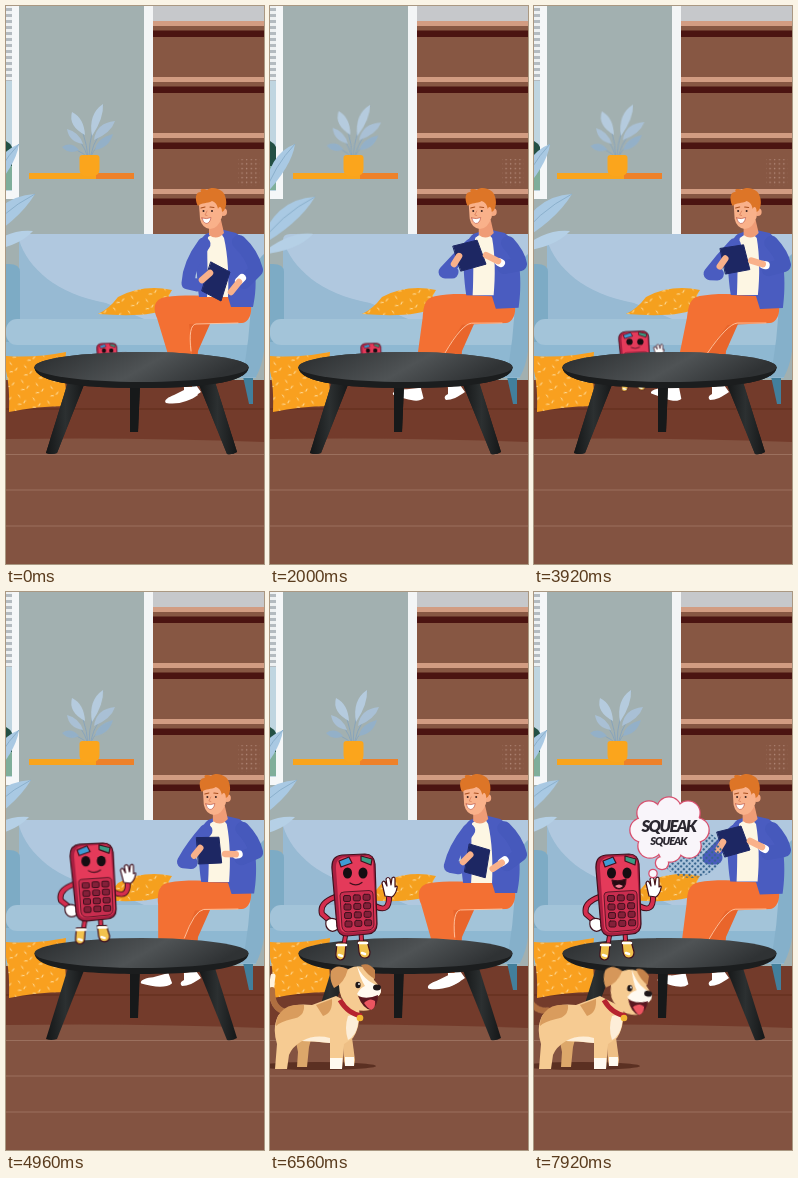
These frames come from a looping animation (258 by 558 pixels, 8000 ms). An HTML page:

```html
<!DOCTYPE html>
<html lang="en">
<head>
<meta charset="utf-8">
<title>Living room</title>
<style>
html, body { margin: 0; width: 100%; height: 100%; overflow: hidden; background: #835341; }
svg { display: block; width: 100vw; height: 100vh; }
text { font-family: Lato, "Open Sans", sans-serif; font-weight: 900; font-style: italic; text-anchor: middle; fill: #2b2730; }

.leaf-hi { animation: leaf-hi 8s linear infinite; }
.leaf-lo { animation: leaf-lo 8s linear infinite; }
.pot-plant { transform-origin: 83px 152px; animation: pot 8s ease-in-out infinite; }
.cover { animation: cover 8s step-end infinite; }
.phone { transform-origin: 84px 262px; animation: hop 8s linear infinite; }
.wave { transform-origin: 108px 307px; animation: wave .8s ease-in-out infinite; }
.smile { animation: until-talk 8s step-end infinite; }
.talk { animation: from-talk 8s step-end infinite; }
.dog { animation: enter 8s linear infinite; }
.dog-head { transform-origin: 75px 412px; animation: nod 8s ease-in-out infinite; }
.tail { transform-origin: 12px 418px; animation: wag 8s ease-in-out infinite; }
.bubble { transform-origin: 119px 284px; animation: pop 8s ease-out infinite; }

@keyframes leaf-hi {
  0% { transform: none; } 15%, 35% { transform: translateX(12px); }
  49% { transform: translateX(3px); } 60%, 100% { transform: none; }
}
@keyframes leaf-lo {
  0% { transform: translateX(2px); } 15% { transform: translateX(12px); }
  33%, 36% { transform: translate(23px, 5px); } 49% { transform: translateX(11px); }
  62% { transform: translateX(-2px); } 82% { transform: none; } 100% { transform: translateX(-2px); }
}
@keyframes pot {
  0%, 65%, 100% { transform: none; } 35% { transform: rotate(4deg); }
}
@keyframes cover { 0% { opacity: 1; } 56%, 100% { opacity: 0; } }
@keyframes hop {
  0%, 44% { transform: translate(17px, 75px) rotate(0deg) scale(.47, .4); }
  49%, 51% { transform: translate(16px, 63px) rotate(0deg) scale(.7, .57); }
  56% { transform: translate(9px, -26px) rotate(3deg) scale(.94, .92); }
  59% { transform: translate(5px, -34px) rotate(-3deg) scale(.98); }
  62% { transform: translate(2px, -11px) rotate(-1deg) scale(1, .95); }
  64% { transform: translate(0, 2px) rotate(0deg) scale(1.02, .98); }
  66%, 100% { transform: none; }
}
@keyframes wave {
  0%, 20%, 90%, 100% { transform: none; } 40% { transform: rotate(6deg); } 70% { transform: rotate(-5deg); }
}
@keyframes until-talk { 0% { opacity: 1; } 88%, 100% { opacity: 0; } }
@keyframes from-talk { 0% { opacity: 0; } 88%, 100% { opacity: 1; } }
@keyframes enter {
  0%, 67% { transform: translate(-125px, 0); } 69.5% { transform: translate(-95px, 4px); }
  72% { transform: translate(-60px, 0); } 74.5% { transform: translate(-26px, 4px); }
  77%, 100% { transform: none; }
}
@keyframes nod {
  0%, 83% { transform: none; } 88% { transform: translate(5px, 1px) rotate(9deg); }
  93% { transform: none; } 98%, 100% { transform: translate(5px, 1px) rotate(9deg); }
}
@keyframes wag {
  0%, 82% { transform: none; } 86% { transform: rotate(-28deg); } 90% { transform: none; }
  94% { transform: rotate(-6deg); } 98%, 100% { transform: rotate(-30deg); }
}
@keyframes pop {
  0%, 88% { transform: scale(0); } 90% { transform: scale(1.08); } 91.5%, 100% { transform: none; }
}
</style>
</head>
<body>
<svg viewBox="0 0 258 558">
  <defs>
    <linearGradient id="top" x1="0" x2="1" y2=".25">
      <stop offset="0" stop-color="#292c2e"/><stop offset=".6" stop-color="#4f5355"/><stop offset="1" stop-color="#2f3234"/>
    </linearGradient>
    <linearGradient id="wood" x2="1">
      <stop offset="0" stop-color="#141617"/><stop offset=".5" stop-color="#2c3031"/><stop offset="1" stop-color="#151718"/>
    </linearGradient>
    <pattern id="blind" width="8" height="6" patternUnits="userSpaceOnUse">
      <rect width="8" height="6" fill="#eef1f2"/><rect width="8" height="3" y="2" fill="#b4bbc0"/>
    </pattern>
    <pattern id="specks" width="15" height="15" patternUnits="userSpaceOnUse" patternTransform="rotate(12)">
      <path d="M3 3l2 1.600M11 7l-1 2.400M5 12l2.400-.6" stroke="#ffeab8" stroke-width=".9" stroke-linecap="round"/>
    </pattern>
    <pattern id="dots" width="4.600" height="4.600" patternUnits="userSpaceOnUse">
      <circle cx="1.500" cy="1.500" r=".7" fill="#b58d7d"/>
    </pattern>
    <pattern id="halftone" width="4" height="4" patternUnits="userSpaceOnUse" patternTransform="rotate(45)">
      <circle cx="2" cy="2" r="1.250" fill="#37658f"/>
    </pattern>
    <g id="puffs">
      <ellipse cx="136" cy="238" rx="33" ry="25"/>
      <circle cx="115" cy="221" r="11.500"/><circle cx="135" cy="217" r="11.500"/><circle cx="154" cy="221" r="11.500"/>
      <circle cx="163" cy="238" r="11.500"/><circle cx="155" cy="254" r="11.500"/><circle cx="136" cy="258" r="11.500"/>
      <circle cx="116" cy="254" r="11.500"/><circle cx="108" cy="238" r="11.500"/>
      <circle cx="128" cy="271" r="6"/><circle cx="119" cy="281.500" r="3.500"/>
    </g>
    <g id="table">
      <path d="M124 379h10l-2 47h-8z" fill="#17191a"/>
      <path d="M62 376h17L51 447q-6 2-11 0z" fill="url(#wood)"/>
      <path d="M192 376h17l22 70q-5 3-10 2z" fill="url(#wood)"/>
      <path d="M28.500 361c0 10 20 21 107 21s107-11 107-21z" fill="#1b1d1e"/>
      <ellipse cx="135.500" cy="361" rx="107" ry="15" fill="url(#top)"/>
    </g>
    <path id="throw" d="M92 308Q103 303 112 291Q137 278 166 284Q159 294 164 302Q145 312 92 308z"/>
    <path id="cushion" d="M0 350Q30 352 60 346Q57 372 62 400Q30 400 3 406Q4 380 0 365z"/>
  </defs>

  <!-- wall, window and bookcase -->
  <rect width="258" height="400" fill="#a2b0b0"/>
  <rect width="8" height="190" fill="#bfd5e0"/>
  <path d="M0 135q4 2 6 6v21H0z" fill="#235044"/>
  <path d="M0 160h6v24H0z" fill="#7fae9a"/>
  <rect width="7" height="75" fill="url(#blind)"/>
  <path d="M6 0h7v193H0v-8h6z" fill="#f5f7f8"/>
  <rect x="138" width="9" height="230" fill="#f3f5f6"/>
  <rect x="147" width="111" height="230" fill="#875743"/>
  <rect x="147" width="111" height="15" fill="#c6c8cb"/>
  <g id="shelves"></g>
  <rect x="232" y="153" width="22" height="27" fill="url(#dots)"/>

  <!-- potted plant -->
  <g class="pot-plant" fill="#a9c0d5">
    <path d="M83 152Q83 124 97 99M82 152Q80 126 67 108M84 152Q90 124 107 117M82 152Q76 132 62 125M82 152Q73 142 58 142M84 152Q90 138 105 130"
      stroke="#88a4bb" fill="none"/>
    <path d="M86 130Q82 108 97 98Q98 112 86 130M79 129Q62 120 66 106Q78 112 79 129" fill="#b5cbde"/>
    <path d="M88 134Q90 117 109 115Q105 127 88 134M77 138Q63 136 61 123Q73 126 77 138"/>
    <path d="M73 144Q63 149 56 141Q65 135 73 144M89 144Q91 132 107 128Q103 142 89 144" fill="#93b0c8"/>
  </g>
  <rect x="23" y="167" width="105" height="6" fill="#f9a41c"/>
  <rect x="90" y="167" width="38" height="6" fill="#ee8129"/>
  <path d="M73.500 152q0-3 3-3h14q3 0 3 3v11q0 7-7 7h-6q-7 0-7-7z" fill="#fba51c"/>

  <!-- floor -->
  <rect y="374" width="258" height="62" fill="#733b2b"/>
  <path d="M0 403H258" stroke="#66301f" stroke-width="1.500"/>
  <path d="M0 433Q130 431 258 436V558H0z" fill="#835341"/>
  <path d="M0 448.500H258M0 484H258M0 520H258" stroke="#9b705e" stroke-width="1.200"/>

  <!-- sofa -->
  <path d="M236 366h11v32h-4z" fill="#427f9c"/>
  <path d="M13 234q0-6 7-6H258V345H13z" fill="#b0c8df"/>
  <path d="M13 234C22 262 50 288 100 297L150 318H13z" fill="#97bad3"/>
  <path d="M0 258q14-1 14 8v84H0z" fill="#7dabc5"/>
  <rect y="336" width="250" height="36" fill="#8eb8d2"/>
  <rect x="0" y="313" width="252" height="26" rx="11" fill="#a3c4d9"/>
  <path d="M258 248Q247 256 245 290Q244 335 236 371H250Q256 360 258 345z" fill="#85b0ca"/>

  <!-- leaves at the left edge -->
  <g class="leaf-hi">
    <path d="M-18 190Q-14 148 13 138Q10 160-18 190" fill="#a9c9e3"/>
    <path d="M-18 190Q-8 160 13 138" stroke="#8bb0cc" fill="none"/>
  </g>
  <g class="leaf-lo">
    <path d="M-30 238Q-14 190 27 188Q10 216-30 238" fill="#a9c9e3"/>
    <path d="M-30 238Q-8 206 27 188" stroke="#8bb0cc" fill="none"/>
    <path d="M-28 246Q0 222 25 225Q10 242-28 246" fill="#b5d0e6"/>
  </g>

  <!-- pillows -->
  <use href="#throw" fill="#f5a01e"/><use href="#throw" fill="url(#specks)"/>
  <use href="#cushion" fill="#f9a01f"/><use href="#cushion" fill="url(#specks)"/>

  <!-- seated man: data-a and data-b are the two ends of each pose -->
  <g class="man" stroke-linecap="round" stroke-linejoin="round">
    <path d="M212 300H176L172 345 178 383H189L192 345z" fill="#e9652b"/>
    <path d="M178 381L190 379 195 386C188 391 182 394 176 394C173 391 176 389 178 388z" fill="#fff"/>
    <path data-leg fill="#fff"
      data-a="M186 380L192 389C184 395 172 399 160 397C157 394 163 391 168 389Z"
      data-b="M143 382L145 393C140 398 128 392 115 387C113 384 122 381 130 382Z"/>
    <path data-leg fill="#f37033"
      data-a="M243 292C215 290 180 288 160 291C147 293 147 303 151 312L161 345L170 381L186 381L186 345L183 318L236 317C246 316 247 300 243 292Z"
      data-b="M243 292C215 288 185 286 166 290C156 292 155 300 153 312L145 347L127 381L139 381L172 347L194 319L236 317C246 316 247 300 243 292Z"/>
    <path data-leg fill="none" stroke="#ffc7a3" stroke-width=".9"
      data-a="M232 317L190 318Q182 319 185 345" data-b="M232 317L204 317Q194 318 173 347"/>
    <path data-leg fill="#4a5cc0"
      data-a="M200 228C190 235 189 255 193 291L222 291L225 301L247 301C252 280 252 240 230 227L214 223Z"
      data-b="M204 228C194 236 192 254 197 289L222 290L226 303L249 302C252 280 252 240 236 227L218 223Z"/>
    <path data-leg fill="#fdf6e3"
      data-a="M202 231L213 224L218 232C222 250 223 270 222 291L201 291C203 270 200 250 202 231Z"
      data-b="M206 232L216 225L223 232C226 250 226 270 224 289L203 289C204 270 203 250 206 232Z"/>
    <g class="head">
      <path d="M203 214h12l3 13q-7 8-15 2z" fill="#ef9c76"/>
      <circle cx="217" cy="206" r="4" fill="#f5a982"/>
      <path d="M193 198Q204 188 216 198L216 211Q212 223 204 223Q196 222 194 213z" fill="#f9b18a"/>
      <path d="M192 200C188 193 190 185 195 186C193 182 199 183 201 184C207 179 218 184 219 190C222 197 219 205 216 206C216 200 213 200 212 203C211 198 209 196 206 195C201 198 196 196 192 200z" fill="#dd7527"/>
      <path d="M195 202l4-1M204 201l4 .5" stroke="#a94f1e" fill="none" stroke-width="1.100"/>
      <circle cx="197.500" cy="205" r="1" fill="#3a2320"/><circle cx="206" cy="205" r="1" fill="#3a2320"/>
      <path d="M201 205l-2 4 2 .5" stroke="#df8560" fill="none" stroke-width=".9"/>
      <path d="M196 212q5 1.500 9-.5-1 6-5 6-3-.5-4-5.500z" fill="#fff" stroke="#b5493a" stroke-width=".6"/>
    </g>
    <path data-arm fill="none" stroke="#4a5cc0" stroke-width="13"
      data-a="M198 238Q183 258 182 277L191 279" data-b="M201 239Q188 252 175 266L182 266"/>
    <path data-arm fill="none" stroke="#4659bc" stroke-width="14"
      data-a="M233 236Q246 248 250 264L238 276" data-b="M238 237Q248 248 250 258L234 261"/>
    <path data-arm fill="none" stroke="#fff" stroke-width="8"
      data-a="M236 272L233 275" data-b="M231 257L229 256"/>
    <path data-arm fill="#1d2763" stroke="#1d2763"
      data-a="M205 256L224 266L215 295L196 285Z" data-b="M183 240L207 234L216 258L191 265Z"/>
    <path data-arm fill="none" stroke="#f9b18a" stroke-width="6.500"
      data-a="M196 274L204 267" data-b="M184 258L189 250"/>
    <path data-arm fill="none" stroke="#f9b18a" stroke-width="6.500"
      data-a="M233 276L225 286" data-b="M228 255L216 249"/>
  </g>

  <use href="#table"/>

  <!-- phone character -->
  <g class="phone" stroke="#40101d" stroke-width="1.200" stroke-linejoin="round" stroke-linecap="round">
    <path d="M76 341L73 358M91 340L92 356" stroke-width="5"/>
    <path d="M76 341L73 358M91 340L92 356" stroke="#d42e4e" stroke-width="3"/>
    <path d="M67 351h9l-1 11q0 6-5 6-5-1-4-7z" fill="#f1c24d"/>
    <path d="M88 349h9l3 11q0 6-5 6-5 0-6-6z" fill="#f1c24d"/>
    <path d="M67 353h9M89 351h8M69 363l3 1M92 361l3 1" stroke="#fff" stroke-width="2.500"/>
    <path d="M65 305Q49 311 52 322L59 328" fill="none" stroke-width="6"/>
    <path d="M65 305Q49 311 52 322L59 328" fill="none" stroke="#d42e4e" stroke-width="4"/>
    <path d="M56 329q4-4 9-2l5 3q1 3-3 3l1 4q-5 4-9 1-4-3-3-9z" fill="#fff"/>
    <g class="wave">
      <path d="M105 314Q120 322 119 303" fill="none" stroke-width="6"/>
      <path d="M105 314Q120 322 119 303" fill="none" stroke="#d42e4e" stroke-width="4"/>
      <path d="M115 304l-3-13q1-3 3-1l2 4-1-7q2-3 4 0l1 6 1-7q3-2 3 1v8q3-2 2 1-1 6-5 9z" fill="#fff"/>
    </g>
    <path d="M62 277Q61 264 72 263L95 262Q104 262 105 272L107 332Q107 341 98 342L77 344Q68 344 67 335z" fill="#a91f41"/>
    <path d="M66 277Q65 266 75 265L95 264Q103 264 103 272L106 331Q106 338 98 339L78 341Q70 341 70 334z" fill="#e43a5a" stroke="none"/>
    <path d="M69 269l10-4 3 6-11 4z" fill="#3e9bd4"/>
    <path d="M91 264l11 3-1 6-10-4z" fill="#3a9d84"/>
    <g fill="#160d12" stroke="none">
      <ellipse cx="77.500" cy="281" rx="4.500" ry="5.500"/><ellipse cx="93" cy="281" rx="4.500" ry="5.500"/>
    </g>
    <path class="smile" d="M80 291q6 4 12-.5" fill="none"/>
    <g class="talk">
      <path d="M78 288q7 2 14-1 0 10-7 10-6 0-7-9z" fill="#260a12"/>
      <path d="M81 294q4-3 8 0-4 4-8 0z" fill="#f27f93" stroke="none"/>
    </g>
    <path d="M70 303Q70 300 74 300L99 298.500Q103 298.500 103 302L104 332Q104 337 99 338L78 340Q73 340 72 335z" fill="#c92d4f" stroke-width=".8"/>
    <g id="keys" fill="#842039" stroke-width="1"></g>
  </g>
  <use class="cover" href="#table"/>

  <!-- speech bubble -->
  <g class="bubble">
    <ellipse cx="157" cy="261" rx="31" ry="25" fill="url(#halftone)"/>
    <use href="#puffs" fill="#fff" stroke="#d8506f" stroke-width="2.600"/>
    <use href="#puffs" fill="#f9f5fa"/>
    <text x="134.500" y="239.500" font-size="16.500" letter-spacing="-1.600">SQUEAK</text>
    <text x="134.500" y="252.500" font-size="11" letter-spacing="-1">SQUEAK</text>
  </g>

  <!-- dog -->
  <g class="dog">
    <ellipse cx="47" cy="474" rx="59" ry="4" fill="#5b3022"/>
    <g class="tail" fill="none" stroke-linecap="round">
      <path d="M13 419Q-2 414 3 384" stroke="#fff3df" stroke-width="5"/>
      <path d="M13 419Q2 415 2 398" stroke="#b06f40" stroke-width="6"/>
    </g>
    <path d="M24 440l4 20-1 15h10l2-20 4-15z" fill="#dca76a"/>
    <path d="M72 440l2 28 1 6h9l1-6-4-30z" fill="#eebf85"/>
    <path d="M8 424Q18 410 42 413L66 404 89 416Q91 434 83 446L74 452 72 477H60L60 451Q42 449 32 449Q22 455 19 463L17 477H5L7 452Q2 436 8 424z" fill="#f6cb92"/>
    <path d="M32 449Q45 442 60 446V451Q44 449 32 449M78 424Q90 420 88 432Q86 444 78 448Q74 436 78 424z" fill="#fdeed8"/>
    <path d="M11 420Q18 411 34 413Q35 425 22 427Q10 430 6 434Q6 425 11 420z" fill="#d99c5d"/>
    <path d="M46 413L62 407Q63 421 53 424z" fill="#d99c5d"/>
    <path d="M60 466h12.500l-.5 11H60zM75 465h9v9h-9z" fill="#fffaf0"/>
    <path d="M70 408Q78 422 92 424" stroke="#b6232f" stroke-width="5" fill="none"/>
    <circle cx="90" cy="426" r="3.300" fill="#f2b632"/>
    <g class="dog-head">
      <path d="M70 384Q82 370 98 376Q104 380 104 388L111 396Q112 404 104 406L100 418Q88 421 78 413Q66 404 70 384z" fill="#f6cb92"/>
      <path d="M87 374Q92 384 99 389L111 396Q112 404 104 406Q92 408 87 402Q90 396 95 394Q90 386 87 374z" fill="#fffaf0"/>
      <path d="M78 377Q66 371 61 379Q59 388 64 396Q74 392 78 377z" fill="#d6975a"/>
      <path d="M91 373Q99 370 105 378L105 387Q97 383 91 373z" fill="#c4824a"/>
      <path d="M88 404Q97 408 108 403Q108 414 101 418Q93 417 88 404z" fill="#5a1820"/>
      <path d="M94 411Q100 405 105 409Q106 416 101 418Q97 416 94 411z" fill="#ec5560"/>
      <ellipse cx="107" cy="395.500" rx="4" ry="3" fill="#1f1718"/>
      <ellipse cx="88" cy="393" rx="2.600" ry="3.200" fill="#1f1718"/>
      <circle cx="89" cy="392" r=".9" fill="#fff"/>
    </g>
  </g>
</svg>
<script>
const $ = s => document.querySelector(s);
const all = s => [...document.querySelectorAll(s)];

$('#shelves').innerHTML = [15, 71, 127, 183].map(y =>
  `<rect x="147" y="${y}" width="111" height="5" fill="#d29c82"/>` +
  `<rect x="147" y="${y + 9.5}" width="111" height="6.5" fill="#4b1411"/>`).join('');

let keys = '';
for (let row = 0; row < 4; row++)
  for (let col = 0; col < 3; col++)
    keys += `<rect x="${73.5 + col * 9.8 + row * .5}" y="${303.5 + row * 8.5 - col * .6}" width="7" height="6" rx="1.6"/>`;
$('#keys').innerHTML = keys;

const LOOP = 8000, CYCLE = 6000;
const armKeys = [[0, 0], [560, .25], [1200, .85], [1920, 1], [2800, .95], [3920, .85], [4960, .65], [CYCLE, 0]];
const legKeys = [[0, 0], [560, .03], [1200, .6], [1920, .8], [2800, 1], [3920, .95], [4960, .55], [CYCLE, 0]];

function at(track, t) {
  const i = track.findIndex(k => k[0] > t);
  const [t0, a] = track[i - 1], [t1, b] = track[i];
  return a + (b - a) * (t - t0) / (t1 - t0);
}

function mix(a, b, u) {
  const to = b.match(/[\d.]+/g);
  let i = 0;
  return a.replace(/[\d.]+/g, n => (+n + (to[i++] - n) * u).toFixed(2));
}

const arms = all('[data-arm]'), legs = all('[data-leg]'), head = $('.head');
const pose = (parts, u) => parts.forEach(p => p.setAttribute('d', mix(p.dataset.a, p.dataset.b, u)));

function draw(t) {
  const phase = t % LOOP % CYCLE, lean = at(legKeys, phase);
  pose(arms, at(armKeys, phase));
  pose(legs, lean);
  head.setAttribute('transform', `translate(${7 * lean} 0)`);
}

let start;
function tick(now) {
  start ??= now;
  draw(now - start);
  requestAnimationFrame(tick);
}
draw(0);
requestAnimationFrame(tick);
</script>
</body>
</html>
```
